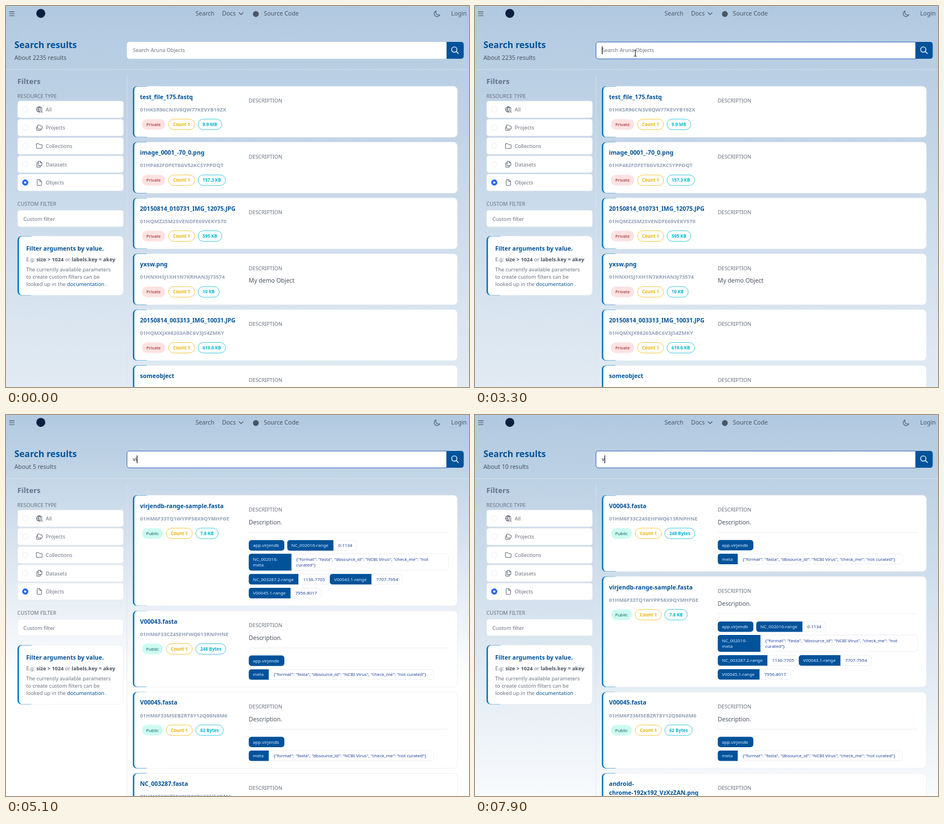
An HTML page for the animation above (8000 ms loop, 825x679 px).

```html
<!DOCTYPE html>
<html lang="en">
<head>
<meta charset="utf-8">
<title>Search results</title>
<style>
  html, body { margin: 0; width: 100%; height: 100%; overflow: hidden; }
  svg { display: block; width: 825px; height: 679px; font-family: "Noto Sans", sans-serif; }
  text { white-space: pre; }
</style>
</head>
<body>
<svg id="stage" viewBox="0 0 825 679"></svg>
<script>
const BLUE = '#00529a', GRAY = '#6b7280', DARK = '#4b5563', LINE = '#e5e7eb';
const XS = 7.92, SM = 9.24, BASE = 10.56;
const stage = document.getElementById('stage');
const pen = document.createElement('canvas').getContext('2d');

const textWidth = (s, size, weight) => {
  pen.font = `${weight} ${size}px "Noto Sans", sans-serif`;
  return pen.measureText(s).width;
};
const text = (x, y, s, size, fill, weight = 400, extra = '') =>
  `<text x="${x}" y="${y}" font-size="${size}" fill="${fill}" font-weight="${weight}" ${extra}>${s}</text>`;
const rect = (x, y, w, h, r, fill, stroke = 'none', sw = .66) =>
  `<rect x="${x}" y="${y}" width="${w}" height="${h}" rx="${r}" fill="${fill}" stroke="${stroke}" stroke-width="${sw}"/>`;
const circle = (x, y, r, fill, stroke = 'none') =>
  `<circle cx="${x}" cy="${y}" r="${r}" fill="${fill}" stroke="${stroke}" stroke-width=".8"/>`;
const path = (d, stroke, sw = 1, x = 0, y = 0, fill = 'none') =>
  `<path d="${d}" transform="translate(${x} ${y})" fill="${fill}" stroke="${stroke}" stroke-width="${sw}" stroke-linecap="round" stroke-linejoin="round"/>`;
const leftRounded = (x, y, w, h, r, fill) =>
  path(`M${w} 0H${r}Q0 0 0 ${r}V${h - r}Q0 ${h} ${r} ${h}H${w}Z`, 'none', 0, x, y, fill);

// White panel with a blue edge that tapers around the left corners
const panel = (x, y, w, h) =>
  rect(x + .3, y, w - .6, h, 7, '#fff', LINE) + rect(x, y, 30, h, 7, '#0277bd') +
  `<rect x="${x + 2.6}" y="${y + .4}" width="60" height="${h - .8}" rx="5.4" ry="6.6" fill="#fff"/>`;

function pills(y, isPublic, size) {
  const kinds = isPublic
    ? [['Public', '#ccfbf1', 'none', '#115e59', 500, 38.2]]
    : [['Private', '#fde2e2', 'none', '#9b1c1c', 500, 42.2]];
  kinds.push(['Count 1', '#fff', '#f2c230', '#eab308', 700], [size, '#fff', '#2cc4dc', '#06b6d4', 700]);
  let x = 241.8, out = '';
  for (const [label, fill, stroke, ink, weight, fixed] of kinds) {
    const w = fixed || textWidth(label, XS, weight) + 17;
    out += rect(x + .4, y - 9.4, w - .8, 18.8, 9.4, fill, stroke, .9) +
      text(x + w / 2, y + 2.9, label, XS, ink, weight, 'text-anchor="middle"');
    x += w + 5.2;
  }
  return out;
}

// Label with a dark key and an optional white value
function tag(x, y, key, keyW, value = [], totalW = 0) {
  const rows = Math.max(key.length, value.length), h = rows > 1 ? 30 : 18.6, top = y - h / 2;
  const lines = (list, tx, ink) => list.map((s, i) =>
    text(tx, y + 2.9 + (i - (list.length - 1) / 2) * 10.5, s, XS, ink, 500)).join('');
  const box = totalW
    ? rect(x + .3, top + .3, totalW - .6, h - .6, 5, '#fff', LINE) + leftRounded(x, top, keyW, h, 5, BLUE)
    : rect(x, top, keyW, h, 5, BLUE);
  return box + lines(key, x + 7.4, '#dbeafe') + lines(value, x + keyW + 8.5, '#1e429f');
}

const APP = ['app.virjendb'];
const META = '{"format": "fasta", "dbsource_id": "NCBI Virus", "check_me": "not curated"}';
const metaTags = y => tag(432.6, y + 89, APP, 63.4) + tag(432.6, y + 113.6, ['meta'], 35.6, [META], 329.6);
const rangeTags = y =>
  tag(432.6, y + 89.4, APP, 63.4) +
  tag(501.2, y + 89.4, ['NC_002016-range'], 82.2, ['0-1134'], 123.8) +
  tag(432.6, y + 119.2, ['NC_002016-', 'meta'], 76, [META.slice(0, -10), 'curated"}'], 356) +
  tag(432.6, y + 149.6, ['NC_003287.2-range'], 88.4, ['1136-7705'], 143.8) +
  tag(577, y + 149.6, ['V00043.1-range'], 74.2, ['7707-7954'], 130) +
  tag(432.6, y + 174.4, ['V00045.1-range'], 74.4, ['7956-8017'], 130);

function card(y, { title, id, size, note = '', tags, h = 91 }) {
  const names = [].concat(title), drop = (names.length - 1) * 15.84;
  return panel(226, y, 578.6, h) +
    names.map((s, i) => text(238.8, y + 22.7 + i * 15.84, s, BASE, BLUE, 700)).join('') +
    text(238.8, y + 44.8 + drop, id, SM, '#94a3b8', 700) +
    pills(y + 68 + drop, !!tags, size) +
    text(432.6, y + 29, 'DESCRIPTION', SM, GRAY) +
    text(432.6, y + 51.8, note, BASE, DARK) +
    (tags ? path('M432.6 0H788.6', LINE, .8, 0, y + 66.2) + tags(y) : '');
}

const sample = (title, id, size, tags = metaTags, h = 136) =>
  ({ title, id, size, tags, h, note: 'Description.' });
const v43 = sample('V00043.fasta', '01HM6F33CZ45EHFWQ613RNPHNE', '248 Bytes');
const v45 = sample('V00045.fasta', '01HM6F33M5EBZRT8Y12Q98N8M6', '62 Bytes');
const range = sample('virjendb-range-sample.fasta', '01HM6F33TQ1WYPP58X9QYMHFGE', '7.8 KB', rangeTags, 197.1);
const nc = sample('NC_003287.fasta', '01HM6F33YZ5NKWMKZ6C2NE4QM1', '6.5 KB');
const icon = sample(['android-', 'chrome-192x192_VzXzZAN.png'], '01HM6F33YZ5NKWMKZ6C2NE4QM1', '9 KB');

const pages = [
  { count: 2235, white: 1080, gap: 8.5, cards: [
    { title: 'test_file_175.fastq', id: '01HKSR96CN3V8QW77KEVYB19ZX', size: '9.9 MB' },
    { title: 'image_0001_-70_0.png', id: '01HP482FDFET8GV52KCSYPPDQT', size: '157.3 KB' },
    { title: '20150814_010731_IMG_12075.JPG', id: '01HQMZ25M2SVENDFE69VEKY5T0', size: '595 KB' },
    { title: 'yxsw.png', id: '01HNXHSJ1XH1N7KRHAN3J73574', size: '10 KB', note: 'My demo Object' },
    { title: '20150814_003313_IMG_10031.JPG', id: '01HQMXJX98203ABC6V3JS4ZMKY', size: '619.6 KB' },
    { title: 'someobject', id: '01HGR2S64NHQ8XC7S3P4E1BZ5A', size: '12 KB' } ] },
  { count: 10, white: 740, gap: 8.8, cards: [v43, range, v45, icon] },
  { count: 5, white: 475, gap: 8.8, cards: [range, v43, v45, nc] }
];

function drawPage({ count, white, gap, cards }, i) {
  let y = 143;
  const list = cards.map(c => {
    const out = card(y, c);
    y += (c.h || 91) + gap;
    return out;
  }).join('');
  return `<g class="page"><linearGradient id="sky${i}" gradientUnits="userSpaceOnUse" x1="0" y1="0" x2="0" y2="${white}">
    <stop stop-color="#b1c9e0"/><stop offset="1" stop-color="#fff"/></linearGradient>` +
    rect(0, 0, 825, 679, 0, `url(#sky${i})`) +
    text(15, 96.2, `About ${count} results`, BASE, DARK) + list + '</g>';
}

const FOLDER = 'M-5-3.6V3.6Q-5 4.4-4.2 4.4H4.2Q5 4.4 5 3.6V-1.6Q5-2.4 4.2-2.4H.3L-1.2-4.2H-4.2Q-5-4.2-5-3.6Z';
const SHEET = 'M-3.8-4.6Q-3.8-5.2-3.2-5.2H.8L4-2V4.6Q4 5.2 3.4 5.2H-3.2Q-3.8 5.2-3.8 4.6ZM.8-5.2V-2H4';
const types = [
  ['All', 'M1 5A5 5 0 1 1 5 0M-5 0H0M-4-3H4M-4 3H-.5M0-5Q-4 0 0 5M0-5Q2-3 2.2-1M4.7 2.8A2 2 0 1 1 .7 2.8A2 2 0 1 1 4.7 2.8M4.2 4.3L6 6'],
  ['Projects', 'M-3-4.2V1.6Q-3 2.4-2.2 2.4H4.4Q5.2 2.4 5.2 1.6V-2.2Q5.2-3 4.4-3H1.6L.4-4.6H-2.4ZM-3-1.6H-4.2Q-5-1.6-5-.8V4Q-5 4.8-4.2 4.8H2.2Q3 4.8 3 4V2.4'],
  ['Collections', FOLDER],
  ['Datasets', 'M-1.6-5.2H2L4.6-2.6V2.6H-1.6ZM2-5.2V-2.6H4.6M-1.6-2.6H-4.4V5.2H1.8V2.6'],
  ['Objects', SHEET]
];

const sidebar = text(20.3, 138.8, 'Filters', 13.2, '#64748b', 700) +
  text(20.3, 163.6, 'RESOURCE TYPE', SM, GRAY) +
  types.map(([label, d], i) => {
    const y = 184.2 + i * 32.6, on = label === 'Objects';
    return rect(20.8, y - 15, 188.4, 30, 4, '#fff', LINE) +
      circle(34.3, y, 5, on ? '#1c64f2' : '#fff', on ? '#1c64f2' : LINE) +
      (on ? circle(34.3, y, 2.1, '#fff') : '') +
      path(d, DARK, .9, 59.3, y) + text(70.8, y + 3.5, label, SM, GRAY);
  }).join('') +
  text(20.3, 355.8, 'CUSTOM FILTER', SM, GRAY) +
  rect(20.8, 364, 188.4, 29.6, 4, '#fff', LINE) + text(31, 382.5, 'Custom filter', SM, GRAY) +
  panel(20.5, 410, 188.9, 105.6) +
  text(36, 435.6, 'Filter arguments by value.', BASE, BLUE, 700) +
  text(36, 454.8, `E.g: <tspan font-weight="700" fill="${DARK}">size &gt; 1024</tspan> or <tspan font-weight="700" fill="${DARK}">labels.key = akey</tspan>`, SM, GRAY) +
  text(36, 473, 'The currently available parameters', SM, GRAY) +
  text(36, 486.2, 'to create custom filters can be', SM, GRAY) +
  text(36, 499.4, `looked up in the <tspan fill="${BLUE}">documentation</tspan> .`, SM, GRAY);

const header = path('M6.2 10.4H14.6M6.2 13.8H14.6M6.2 17.2H14.6', DARK, 1.1) +
  circle(62, 13.2, 8, '#0b1f3f') +
  [[337.8, 'Search'], [385, 'Docs'], [459.6, 'Source Code'], [793.3, 'Login']]
    .map(([x, s]) => text(x, 17.4, s, BASE, DARK, 500)).join('') +
  path('M415.4 12L418.9 15.4L422.4 12', DARK, 1.2) +
  circle(445.2, 14.2, 5.2, DARK) +
  path('M773 15.6A5.2 5.2 0 1 1 766.4 8.8A5 5 0 0 0 773 15.6Z', DARK, 1.1) +
  text(15, 74.6, 'Search results', 15.84, BLUE, 700) +
  path('M0 113.4H825M215.4 124V679', '#dde5ee', .8);

const searchBar = leftRounded(215.4, 64, 569.6, 30, 5, '#fff') +
  '<g transform="translate(1031 158) rotate(180)">' + leftRounded(215.4, 64, 30.6, 30, 5, BLUE) + '</g>' +
  `<path id="focus" d="M785 64.2H220.4Q215.6 64.2 215.6 69V89.4Q215.6 94.2 220.4 94.2H785Z" fill="none" stroke="#2f62b5"/>` +
  circle(798.8, 77.6, 4.7, 'none') +
  path('M803.5 77.6A4.7 4.7 0 1 1 794.1 77.6A4.7 4.7 0 1 1 803.5 77.6M802.3 81L806 84.8', '#fff', 1.3) +
  text(226, 82.4, '', SM, GRAY, 400, 'id="query"') +
  '<rect id="caret" y="72" width="1.1" height="14" fill="#000"/>';

const pointers = '<g id="arrow">' + path('M0 0V11L2.6 8.6L4.4 12.4L6 11.6L4.3 8H7.8Z', '#fff', .7, 0, 0, '#000') + '</g>' +
  '<g id="beam">' + ['#fff', '#222'].map((c, i) =>
    path('M-2-5.5Q0-5.5 0-4.5Q0-5.5 2-5.5M0-4.5V4.5M-2 5.5Q0 5.5 0 4.5Q0 5.5 2 5.5', c, i ? 1.1 : 2)).join('') + '</g>';

stage.innerHTML = pages.map(drawPage).join('') + header + sidebar + searchBar + pointers;

const pageNodes = [...stage.querySelectorAll('.page')];
const [focusRing, query, caret, arrow, beam] =
  ['focus', 'query', 'caret', 'arrow', 'beam'].map(id => document.getElementById(id));
const show = (node, on) => node.setAttribute('visibility', on ? 'visible' : 'hidden');

// Value of the last [time, value] entry already reached
const at = (list, t) => list.filter(([from]) => t >= from).pop()[1];
const pageTimes = [[0, 0], [5000, 1], [5100, 2], [7900, 1]];
const typing = [[0, ''], [4900, 'v'], [5000, 'vi'], [5200, 'vir'], [7700, 'vi'], [7900, 'v']];
const caretTimes = [[0, false], [3300, true], [4600, false], [4900, true], [5800, false], [7000, true]];

function render(t) {
  const page = at(pageTimes, t), typed = at(typing, t);
  pageNodes.forEach((node, i) => show(node, i === page));
  query.textContent = typed || 'Search Aruna Objects';
  query.setAttribute('fill', typed ? '#111827' : GRAY);
  show(focusRing, t >= 3300);
  show(caret, at(caretTimes, t));
  caret.setAttribute('x', 226 + textWidth(typed, SM, 400));

  const u = Math.min(7, Math.max(0, Math.floor((t - 600) / 100))) / 7;
  const ease = 1 - (1 - u) ** 2, x = 203 + 82.6 * ease, y = 84 * ease;
  const visible = t >= 600 && t < 4900, overInput = y >= 64;
  show(arrow, visible && !overInput);
  show(beam, visible && overInput);
  for (const node of [arrow, beam]) node.setAttribute('transform', `translate(${x} ${y})`);
}

function tick() {
  render(performance.now() % 8000);
  requestAnimationFrame(tick);
}
tick();
</script>
</body>
</html>
```
